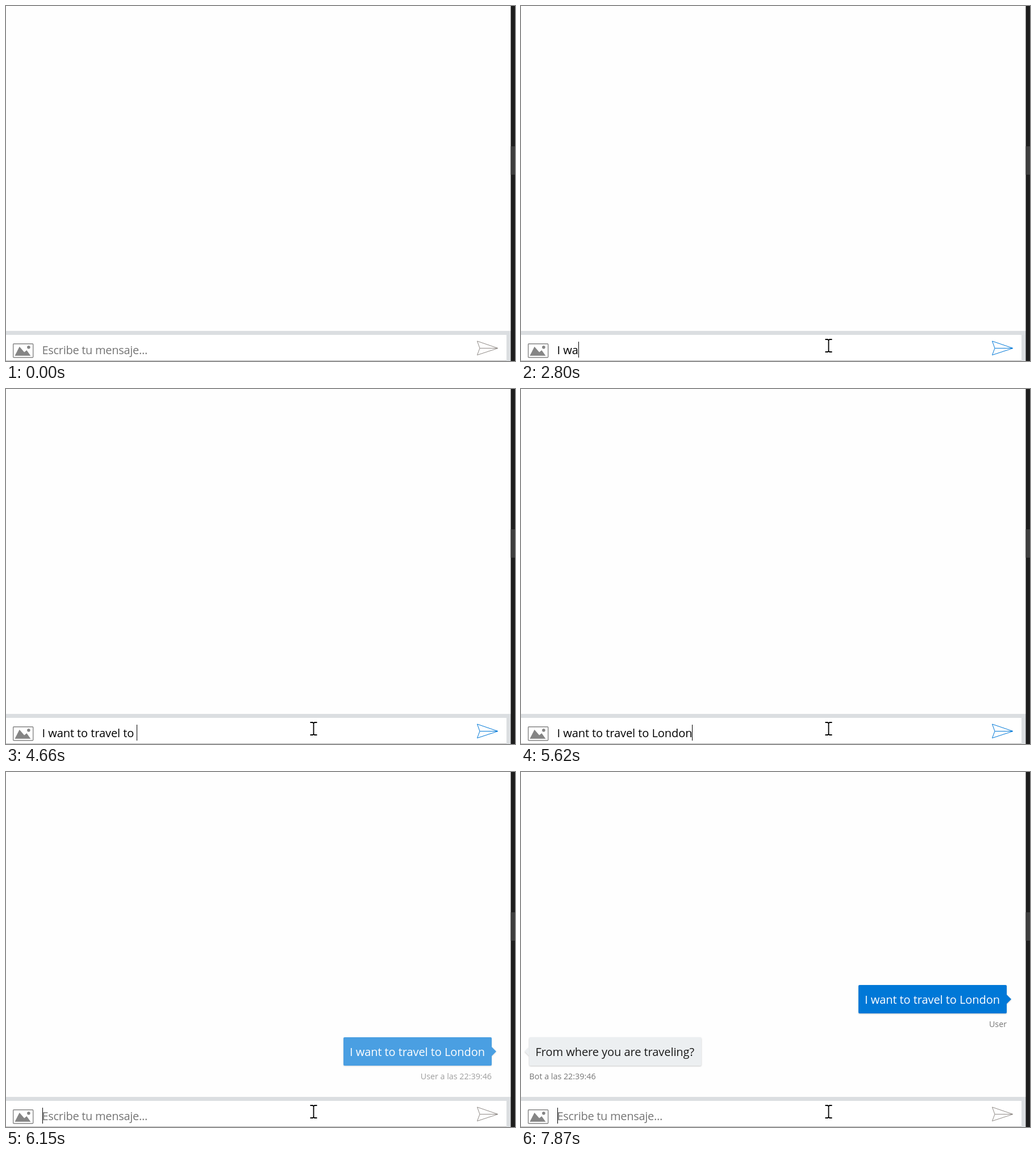
Recreate the animation shown at these times as an HTML page. Size 896 px wide and 625 px high, loop 8 s.

```html
<!DOCTYPE html>
<html lang="es">
<head>
<meta charset="utf-8">
<title>Chat</title>
<style>
  html, body { margin: 0; width: 100%; height: 100%; overflow: hidden; background: #fefefe; }
  svg { display: block; width: 896px; height: 625px; }
  text { font: 20px "Open Sans", "Noto Sans", sans-serif; letter-spacing: -.06px; white-space: pre; }
  .meta { font-size: 14.3px; letter-spacing: 0; fill: #767676; }
  .shadow { filter: drop-shadow(0 1px 1px rgba(0, 0, 0, .22)); }
  #hint { fill: #757575; letter-spacing: -.29px; }
  #send { fill: none; stroke-linejoin: round; }
</style>
</head>
<body>
<svg viewBox="0 0 896 625">
  <rect width="896" height="625" fill="#fefefe"/>

  <g id="user">
    <g class="shadow" fill="#0078d7">
      <rect x="594" y="467" width="261" height="50" rx="2"/>
      <path d="M855 484l8 8-8 8z"/>
    </g>
    <text x="605" y="500" fill="#fff">I want to travel to London</text>
    <text id="userMeta" class="meta" x="855" y="540.5" text-anchor="end"></text>
  </g>

  <g id="bot">
    <g class="shadow" fill="#eceff1">
      <rect x="14.5" y="467" width="303" height="50" rx="2"/>
      <path d="M14.5 484l-8 8 8 8z"/>
    </g>
    <text x="25.5" y="500" fill="#1a1a1a">From where you are traveling?</text>
    <text class="meta" x="14.5" y="540.5">Bot a las 22:39:46</text>
  </g>

  <rect y="572" width="889" height="53" fill="#dbdee1"/>
  <rect y="579" width="881" height="46" fill="#fff"/>
  <rect y="624" width="881" height="1" fill="#b4b4b4"/>
  <rect x="888.5" width="7.5" height="625" fill="#1e1e1e"/>
  <rect x="888.5" y="247" width="7.5" height="50" fill="#3e3e3e"/>

  <g fill="#858585">
    <rect x="12.7" y="594.7" width="35" height="24" rx="1" fill="none" stroke="#858585" stroke-width="1.4"/>
    <path d="M15.5 615.7l8.2-15.9 8.5 9.8 4.2-3.7 7 9.8z"/>
    <circle cx="39.9" cy="600.8" r="2.8"/>
  </g>
  <path id="send" d="M829.5 590l36.5 12.5-36.5 12 4.5-12zM834 602.5h32"/>

  <text id="hint" x="63.5" y="612.7">Escribe tu mensaje...</text>
  <text id="typed" x="63.5" y="612.7" fill="#000"></text>
  <rect id="caret" y="591" width="1" height="28"/>

  <path id="arrow" d="M.5.5v22.2l5.2-5 3.4 7.2 3.2-1.5-3.3-7h7z" fill="#fff" stroke="#000"/>
  <g id="beam" fill="none">
    <path id="beamShape" d="M-6-11h4.5L0-9.5 1.5-11H6M0-10V10M-6 11h4.5L0 9.5 1.5 11H6" stroke="#fff" stroke-width="3.4"/>
    <use href="#beamShape"/>
    <path d="M-6-11h4.5L0-9.5 1.5-11H6M0-10V10M-6 11h4.5L0 9.5 1.5 11H6" stroke="#000" stroke-width="1.8"/>
  </g>
</svg>
<script>
const LOOP = 8000, SENT = 5920, REPLIED = 6700, STEP = 77.5;
const MESSAGE = 'I want to travel to London';
const KEY_TIMES = [
  2010, 2160, 2560, 2800, 2880, 2950, 3030, 3180, 3260, 3350, 3580, 3730, 3900,
  3960, 4130, 4200, 4280, 4430, 4600, 4660, 5060, 5210, 5290, 5370, 5450, 5620
];
const CARET_ON = [[1070, 1630], [2010, 6380], [6930, 7410], [7870, LOOP]];

const $ = id => document.getElementById(id);
const show = (id, on) => $(id).setAttribute('visibility', on ? 'visible' : 'hidden');
const place = (id, x, y) => $(id).setAttribute('transform', `translate(${x} ${y})`);
const clamp = v => Math.min(1, Math.max(0, v));
const hold = (t, from, step) => from + Math.floor((t - from) / step + .01) * step;

// CSS "ease" curve, cubic-bezier(.25, .1, .25, 1)
function ease(x) {
  const bezier = (s, a, b) => 3 * (1 - s) ** 2 * s * a + 3 * (1 - s) * s * s * b + s ** 3;
  let lo = 0, hi = 1;
  for (let i = 0; i < 20; i++) {
    const mid = (lo + hi) / 2;
    if (bezier(mid, .25, .25) < x) lo = mid; else hi = mid;
  }
  return bezier(lo, .1, 1);
}

function fade(id, t, begin, firstStep) {
  const p = clamp((hold(t, firstStep, STEP) - begin) / 300);
  $(id).setAttribute('opacity', p > 0 ? ease(p) : 0);
}

function drawInput(t) {
  const sent = t >= SENT;
  const count = sent ? 0 : KEY_TIMES.filter(k => k <= t).length;
  const typed = $('typed');
  typed.textContent = MESSAGE.slice(0, count);
  show('hint', !count);
  $('send').setAttribute('stroke', count ? '#0078d7' : '#8f8a86');
  const end = count ? 63.5 + typed.getComputedTextLength() : 64;
  $('caret').setAttribute('x', Math.round(end));
  show('caret', CARET_ON.some(([on, off]) => t >= on && t < off));
}

function drawPointer(t) {
  const p = clamp((hold(t, 440, 79) - 440) / 550);
  const left = (1 - p) ** 2;
  const x = 539 + 99 * left, y = 597 + 18 * left;
  const beam = (t >= 598 && t < 1070) || t >= 2010;
  place('arrow', x, y);
  place('beam', x + 2.5, y + 1);
  show('arrow', t >= 440 && !beam);
  show('beam', beam);
}

function drawMessages(t) {
  const replied = t >= REPLIED;
  fade('user', t, 5950, SENT);
  fade('bot', t, 6688, REPLIED);
  place('user', 0, replied ? -92 : 0);
  $('userMeta').textContent = replied ? 'User' : 'User a las 22:39:46';
}

let start;
function frame(now) {
  start ??= now;
  const t = (now - start) % LOOP;
  drawInput(t);
  drawPointer(t);
  drawMessages(t);
  requestAnimationFrame(frame);
}
requestAnimationFrame(frame);
</script>
</body>
</html>
```
